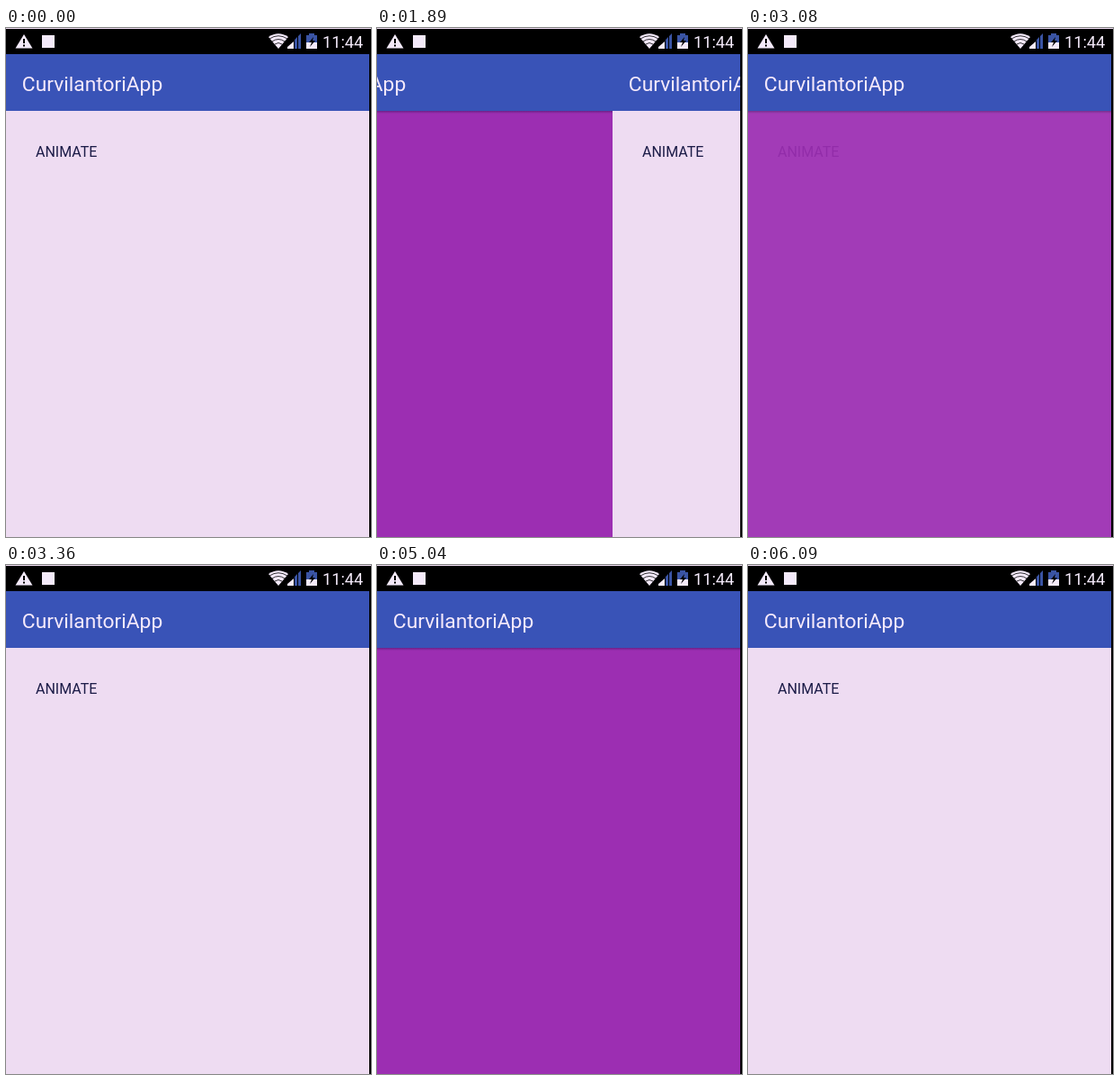
An HTML page for the animation above (7000 ms loop, 406 by 565 pixels).

```html
<!DOCTYPE html>
<html lang="en">
<head>
<meta charset="utf-8">
<title>Screen transition</title>
<style>
  html, body { margin: 0; width: 100%; height: 100%; overflow: hidden; background: #000; }
  svg { display: block; width: 100%; height: 100%; }
  text { font-family: Roboto, sans-serif; }
</style>
</head>
<body>
<svg viewBox="0 0 406 565">
  <defs>
    <linearGradient id="shade" x2="0" y2="1">
      <stop offset="0" stop-color="#301050" stop-opacity=".45"/>
      <stop offset="1" stop-color="#301050" stop-opacity="0"/>
    </linearGradient>
    <g id="bar">
      <rect y="29" width="404" height="63" fill="#3953b7"/>
      <text x="17.8" y="70" font-size="22.8" fill="#f6eafb">CurvilantoriApp</text>
    </g>
  </defs>

  <g id="home">
    <rect y="92" width="404" height="473" fill="#eedcf2"/>
    <use href="#bar"/>
    <text x="33" y="143" font-size="16" fill="#1c1c48">ANIMATE</text>
  </g>
  <g id="detail">
    <rect y="92" width="404" height="473" fill="#9c2eb2"/>
    <use href="#bar"/>
    <rect y="92" width="404" height="3" fill="url(#shade)"/>
  </g>

  <rect x="404" width="2" height="565"/>
  <rect width="406" height="29"/>
  <rect width="406" height="1" fill="#eedcf2"/>

  <g fill="#f4eafa">
    <path d="M20 7L29.500 22.500H10.500Z"/>
    <path d="M19 12h2v5h-2zM19 18.500h2v2h-2z" fill="#000"/>
    <rect x="40" y="8" width="14" height="14"/>
    <path d="M292 10Q303 2.500 314 10L303 23Z"/>
    <path d="M293 12Q303 5.500 313 12M296 15Q303 10 310 15M299 18Q303 15 307 18"
      fill="none" stroke="#000" stroke-width=".8"/>
    <path d="M313 23v-2l7-6v8z"/>
    <path d="M321 23v-10l3-3v13zM325 23v-14l3-3v17z" fill="#3a54a4"/>
    <path d="M334 16h12v7h-12z"/>
    <path d="M334 8h3v-2h6v2h3v8h-12z" fill="#3a54a4"/>
    <path d="M342 10l-5 6h3l-2 5 6-7h-3z" fill="#000"/>
    <text x="352" y="22" font-size="18.2">11:44</text>
  </g>
</svg>
<script>
  const LOOP = 7000, TICK = 70, WIDTH = 404;
  const PUSH = 400, FADE = 260;
  const trips = [{ open: 1727, close: 3060 }, { open: 4646, close: 5830 }];
  const home = document.getElementById('home');
  const detail = document.getElementById('detail');

  const progress = (t, start, length) => Math.min(1, Math.max(0, (t - start) / length));
  const decelerate = p => 1 - (1 - p) ** 2;
  const shift = (el, x) => el.setAttribute('transform', `translate(${x} 0)`);

  function draw(time) {
    const t = Math.floor(time % LOOP / TICK) * TICK;
    const trip = t < 4000 ? trips[0] : trips[1];
    const x = Math.round(WIDTH * decelerate(progress(t, trip.open, PUSH)));
    const fade = progress(t, trip.close, FADE);

    // The opening screen pushes the first one right; closing fades it away.
    shift(home, fade > 0 ? 0 : x);
    shift(detail, x - WIDTH);
    detail.setAttribute('opacity', 1 - fade);
  }

  const begin = performance.now();
  function loop() {
    draw(performance.now() - begin);
    requestAnimationFrame(loop);
  }
  loop();
</script>
</body>
</html>
```
